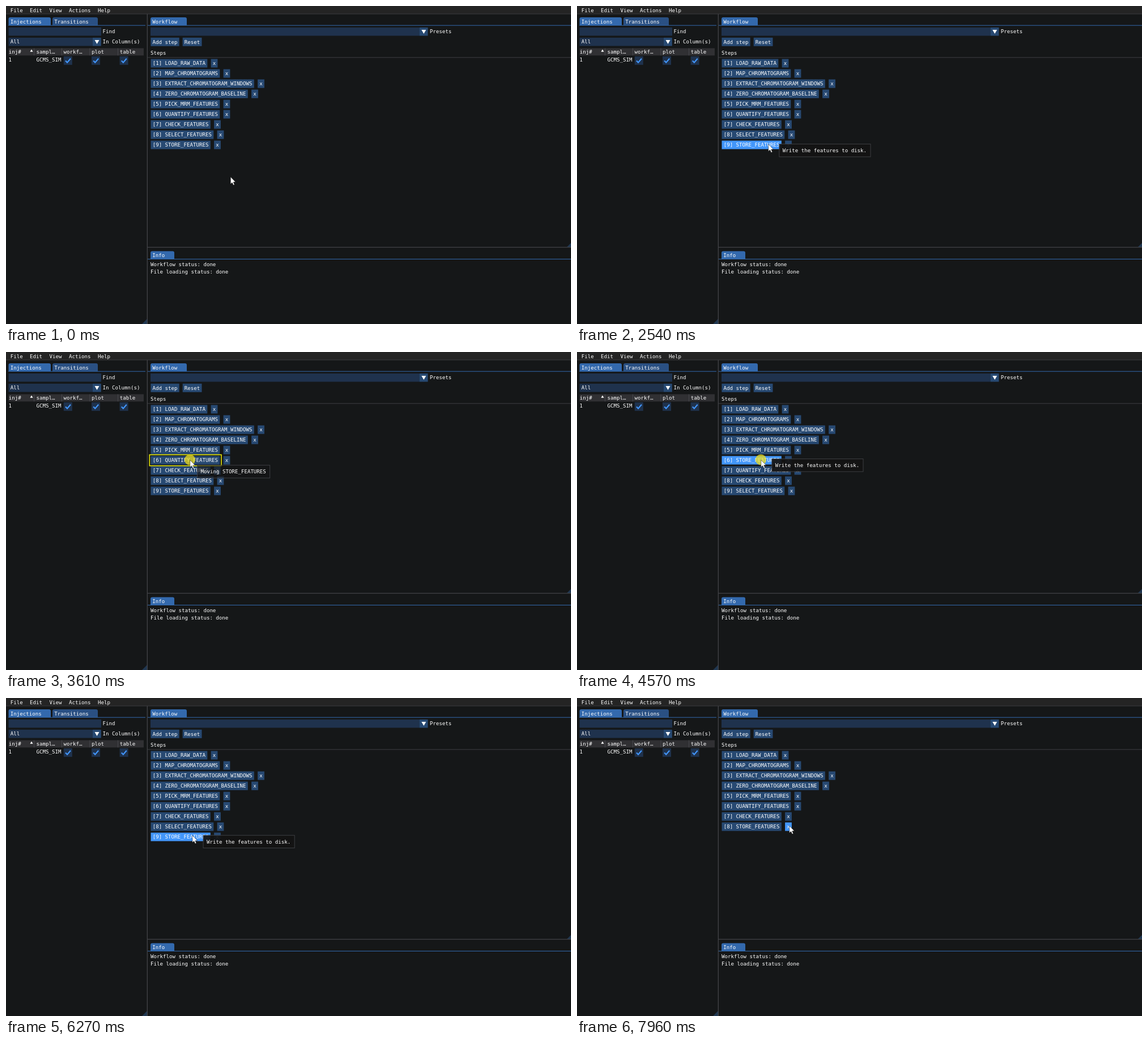
Write an HTML page with a canvas that moves like this. It is 997x561 px and loops after 8 s.

```html
<!DOCTYPE html>
<html lang="en">
<head>
<meta charset="utf-8">
<title>Workflow steps</title>
<style>
  html, body { margin: 0; width: 100%; height: 100%; overflow: hidden; background: #151718; }
  canvas { display: block; }
</style>
</head>
<body>
<canvas id="stage" width="997" height="561"></canvas>
<script>
const ctx = document.getElementById('stage').getContext('2d');
const LOOP = 8000, CHAR = 5.5, ROW_H = 15, PAD = 3.15;
const C = {
  bg: '#151718', menu: '#242424', line: '#424348', frame: '#1f324d',
  button: '#274972', hover: '#4296fa', active: '#0f87fa',
  tab: '#2a5083', tabOn: '#3369ad', head: '#303033', grip: '#203751'
};

const STEPS = ['LOAD_RAW_DATA', 'MAP_CHROMATOGRAMS', 'EXTRACT_CHROMATOGRAM_WINDOWS',
  'ZERO_CHROMATOGRAM_BASELINE', 'PICK_MRM_FEATURES', 'QUANTIFY_FEATURES',
  'CHECK_FEATURES', 'SELECT_FEATURES', 'STORE_FEATURES'];
const HINTS = {
  SELECT_FEATURES: 'Run the peak selection/alignment algorithm.',
  STORE_FEATURES: 'Write the features to disk.'
};

// Cursor moves: start, step length, step count, end point
const START = { x: 396, y: 301 };
const MOVES = [
  { t: 1450, dt: 77, n: 9, x: 339.5, y: 243.3 },
  { t: 2540, dt: 77, n: 4, x: 326.5, y: 243.3 },
  { t: 3150, dt: 80, n: 7, x: 324.5, y: 190, drag: true },
  { t: 4820, dt: 74, n: 10, x: 324.5, y: 243.7, drag: true },
  { t: 6270, dt: 77, n: 5, x: 364.5, y: 226.5 },
  { t: 6657, dt: 77, n: 7, x: 374.5, y: 225 }
];
const PRESSES = [[2143, 2370], [2772, 3940], [4570, 5720], [7880, 7960]];
const HELD = [[2220, 2370], [2850, 3940], [4650, 5720]];
const DRAGS = [[3150, 3940], [4820, 5720]];
const within = (t, spans) => spans.some(([a, b]) => t >= a && t < b);

// lag is counted in steps: the dragged label trails the pointer by one
function pointer(t, lag = 0) {
  let p = START;
  for (const m of MOVES) {
    if (t < m.t) break;
    const k = Math.floor((t - m.t) / m.dt) + 1 - lag;
    const u = Math.min(1, Math.max(0, k / m.n));
    let e = u * u * (3 - 2 * u);
    if (m.drag) e = 1 - (1 - e) ** 2;
    p = { x: p.x + (m.x - p.x) * e, y: p.y + (m.y - p.y) * e };
  }
  return p;
}

function order(t) {
  const list = STEPS.slice();
  if (t >= 3940 && t < 5720) list.splice(5, 0, list.pop());
  if (t >= 7960) list.splice(7, 1);
  return list;
}

function box(x, y, w, h, color) {
  ctx.fillStyle = color;
  ctx.fillRect(x, y, w, h);
}

function text(s, x, yMid, color = '#fff') {
  ctx.fillStyle = color;
  ctx.fillText(s, x, yMid + 3.3);
}

function poly(points, color) {
  ctx.beginPath();
  for (const [x, y] of points) ctx.lineTo(x, y);
  ctx.closePath();
  ctx.fillStyle = color;
  ctx.fill();
}

const buttonWidth = s => s.length * CHAR + 2 * PAD;

function button(s, x, yMid, color = C.button) {
  box(x, yMid - ROW_H / 2, buttonWidth(s), ROW_H, color);
  text(s, x + PAD, yMid);
}

function tab(s, x, y, w, color) {
  ctx.beginPath();
  ctx.roundRect(x, y, w, 14, [3, 3, 0, 0]);
  ctx.fillStyle = color;
  ctx.fill();
  text(s, x + 3.3, y + 7.5);
}

function combo(x, yMid, w) {
  box(x, yMid - 7.3, w - 15, 14.6, C.frame);
  box(x + w - 15, yMid - 7.3, 15, 14.6, C.button);
  const cx = x + w - 7.3;
  poly([[cx - 4, yMid - 3.3], [cx + 4, yMid - 3.3], [cx, yMid + 3.7]], '#fff');
}

function checkbox(x) {
  box(x, 88.8, 15, 15, C.frame);
  ctx.beginPath();
  ctx.moveTo(x + 3.2, 96.6);
  ctx.lineTo(x + 6.2, 99.7);
  ctx.lineTo(x + 12.2, 92.8);
  ctx.strokeStyle = C.hover;
  ctx.lineWidth = 2.2;
  ctx.stroke();
}

function tooltip(s, x, y, alpha) {
  const w = s.length * CHAR + 12.6, h = 22.4;
  ctx.globalAlpha = alpha;
  box(x, y, w, h, '#141414');
  ctx.globalAlpha = 1;
  ctx.strokeStyle = C.line;
  ctx.lineWidth = 0.9;
  ctx.strokeRect(x, y, w, h);
  text(s, x + 5.9, y + 11.4);
}

function drawLeft() {
  tab('Injections', 4.5, 20, 74.5, C.tabOn);
  tab('Transitions', 82, 20, 80, C.tab);
  box(4, 33.7, 242, 1, C.tabOn);
  box(4.5, 37.8, 163.5, 14.6, C.frame);
  text('Find', 170.5, 45);
  combo(4.5, 63.2, 163.3);
  text('All', 7.8, 63);
  text('In Column(s)', 170.5, 63);

  box(4.5, 74.5, 238.5, 12.8, C.head);
  for (const x of [49, 98, 147.5, 197]) box(x, 74.5, 0.9, 12.8, '#4a4a50');
  poly([[42.5, 80.8], [47.5, 80.8], [45, 76.6]], '#fff');
  [['inj#', 4.8], ['sampl…', 53.5], ['workf…', 101.5], ['plot', 151], ['table', 200.8]]
    .forEach(([s, x]) => text(s, x, 81));
  text('1', 4.5, 94.5);
  text('GCMS_SIM', 53.5, 94.5);
  [101.8, 151, 200.6].forEach(checkbox);
  poly([[240, 561], [249, 561], [249, 552]], C.grip);
}

function drawRight() {
  tab('Workflow', 255, 20, 64, C.tabOn);
  box(250, 33.7, 747, 1, C.tabOn);
  combo(255, 45.2, 489.5);
  text('Presets', 747.7, 45);
  button('Add step', 255.4, 63.3);
  button('Reset', 311.7, 63.3);
  text('Steps', 255, 82.5);
  box(250, 90.4, 747, 0.9, C.line);
  poly([[990, 425], [997, 425], [997, 418]], C.grip);

  tab('Info', 255, 432.5, 42, C.tabOn);
  box(250, 446, 747, 1, C.tabOn);
  text('Workflow status: done', 255, 455.5);
  text('File loading status: done', 255, 468.7);
}

function drawFrame() {
  box(0, 0, 997, 561, C.bg);
  box(0, 0, 997, 14, C.menu);
  [['File', 7.7], ['Edit', 42], ['View', 76.6], ['Actions', 111], ['Help', 162]]
    .forEach(([s, x]) => text(s, x, 7.2));
  drawLeft();
  drawRight();
  box(0, 13.6, 997, 0.8, C.line);
  box(248.7, 14, 1.3, 547, C.line);
  box(250, 425, 747, 1.2, C.line);
}

function drawSteps(t) {
  const drag = within(t, DRAGS), held = within(t, HELD);
  const p = pointer(t, drag ? 1 : 0);
  const source = t < 3940 ? 8 : 5;
  const lit = held ? C.active : C.hover;
  let hint = null, target = null;

  order(t).forEach((name, i) => {
    const label = `[${i + 1}] ${name}`, y = 101 + 18 * i, x = 255.5;
    const w = buttonWidth(label), xClose = x + w + 6.3;
    const inRow = Math.abs(p.y - y) <= ROW_H / 2;
    const onStep = inRow && p.x >= x && p.x < x + w;
    const onClose = inRow && !drag && p.x >= xClose && p.x < xClose + buttonWidth('x');
    button(label, x, y, onStep && (!drag || i === source) ? lit : C.button);
    button('x', xClose, y, onClose ? lit : C.button);
    if (onStep && drag && i !== source) target = { x, y, w };
    if (onStep && !drag) hint = HINTS[name];
  });

  if (target) {
    ctx.strokeStyle = '#e8e808';
    ctx.lineWidth = 1.6;
    ctx.strokeRect(target.x - 2.2, target.y - 9.7, target.w + 4.9, 19.4);
  }
  if (drag) tooltip('Moving STORE_FEATURES', p.x + 13, p.y + 7.7, 0.6);
  else if (hint) {
    const lift = t >= 3940 && t < 4820 ? 1.7 : 0;
    tooltip(hint, p.x + 19.4, p.y - lift + 0.3, 0.94);
  }
}

function drawPointer(t) {
  const { x, y } = pointer(t);
  if (within(t, PRESSES)) {
    ctx.beginPath();
    ctx.arc(x, y, 9.5, 0, 2 * Math.PI);
    ctx.fillStyle = 'rgba(236, 220, 30, 0.75)';
    ctx.fill();
  }
  const shape = [[0, 0], [0, 12.6], [2.8, 10], [4.9, 14.6], [6.9, 13.7], [4.9, 9.3], [8.7, 9]];
  ctx.save();
  ctx.translate(x + 0.3, y + 0.5);
  poly(shape, '#fff');
  ctx.strokeStyle = 'rgba(0, 0, 0, 0.75)';
  ctx.lineWidth = 0.6;
  ctx.stroke();
  ctx.restore();
}

function render(now) {
  const t = now % LOOP;
  ctx.font = '9.136px "DejaVu Sans Mono", monospace';
  drawFrame();
  drawSteps(t);
  drawPointer(t);
}

const begin = performance.now();
function tick() {
  render(performance.now() - begin);
  requestAnimationFrame(tick);
}
tick();
</script>
</body>
</html>
```
